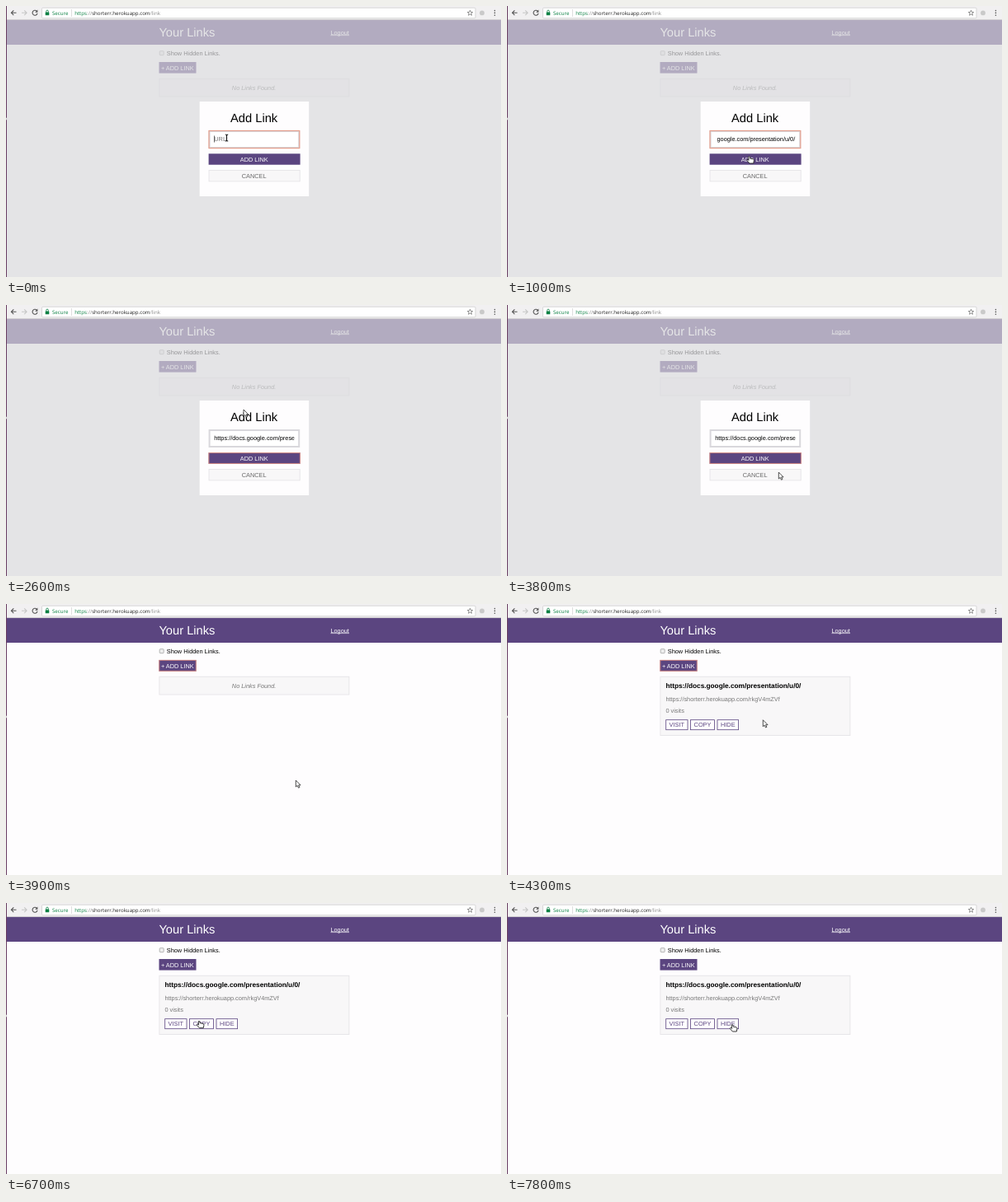
An HTML page for the animation above (8000 ms loop, 600 px wide and 329 px high).

```html
<!DOCTYPE html>
<html lang="en">
<head>
<meta charset="utf-8">
<title>Your Links</title>
<style>
  html, body { margin: 0; height: 100%; overflow: hidden; background: #fefdfe; }
  svg { display: block; width: 100%; height: 100%; }
  text { font: 7.35px "Liberation Sans", Arial, sans-serif; text-rendering: geometricPrecision; white-space: pre; }
  .big { font-size: 14.7px; }
  .bar { font: 6.15px "Open Sans", sans-serif; }
  .mid { text-anchor: middle; }
  .purple { fill: #5b4580; }
  .white { fill: #fff; }
  .grey { fill: #777; }
  .panel { fill: #f8f7f8; stroke: #e3e2e5; stroke-width: .8; }
  .out { fill: #fefdfe; stroke: #5b4580; stroke-width: .8; }
  .ring { fill: none; stroke: #d98a80; stroke-width: .9; }
  .icon { fill: none; stroke: #555; stroke-width: 1.1; }
</style>
</head>
<body>
<svg viewBox="0 0 600 329" preserveAspectRatio="none">
  <!-- page -->
  <rect width="600" height="329" fill="#fefdfe"/>
  <rect class="purple" y="17" width="600" height="30"/>
  <text class="big white" x="185.4" y="37">Your Links</text>
  <text class="white" x="393.4" y="34.5">Logout</text>
  <path d="M393.5 35.6H416" stroke="#fff" stroke-width=".6"/>
  <rect x="186.2" y="54.7" width="5" height="5" rx=".8" fill="#eee" stroke="#a5a5a5" stroke-width=".8"/>
  <text x="194.8" y="60">Show Hidden Links.</text>
  <rect class="purple" x="185.5" y="68" width="45" height="13.6"/>
  <rect id="addRing" class="ring" x="185.8" y="68.3" width="44.4" height="13"/>
  <text class="white" x="187.9" y="77.5">+ ADD LINK</text>

  <g id="empty">
    <rect class="panel" x="185.9" y="88.2" width="230" height="21.8"/>
    <text class="mid grey" x="300.6" y="101.6" font-style="italic" style="font-style:italic">No Links Found.</text>
  </g>
  <g id="card">
    <rect class="panel" x="185.9" y="88.2" width="230" height="71.4"/>
    <text x="192.4" y="102.2" style="font-weight:bold;font-size:8.28px">https://docs.google.com/presentation/u/0/</text>
    <text class="grey" x="192.4" y="117.5">https://shorterr.herokuapp.com/rkgV4mZVf</text>
    <text class="grey" x="192.4" y="132.2">0 visits</text>
    <rect class="out" x="192.7" y="140.7" width="26.3" height="12"/>
    <rect class="out" x="222.5" y="140.7" width="29" height="12"/>
    <rect class="out" x="255" y="140.7" width="25.6" height="12"/>
    <text class="mid purple" x="205.8" y="149.4">VISIT</text>
    <text class="mid purple" x="237" y="149.4">COPY</text>
    <text class="mid purple" x="267.8" y="149.4">HIDE</text>
  </g>

  <g id="modal">
    <rect y="17" width="600" height="312" fill="#dad9dc" opacity=".69"/>
    <rect x="234.7" y="116" width="132.5" height="115" fill="#fefdfe"/>
    <text class="big mid" x="300.6" y="140.5">Add Link</text>
    <rect x="246.6" y="152" width="108.6" height="20" fill="#fff" stroke="#d9d8dc" stroke-width="2"/>
    <rect id="inputRing" x="246" y="151.4" width="109.8" height="21.2" fill="none" stroke="#e59c88" stroke-width="1.1"/>
    <g id="hint">
      <text class="grey" x="252.3" y="164">URL</text>
      <path d="M252.5 157.5V165.5" stroke="#222" stroke-width=".7"/>
    </g>
    <text id="tail" x="349.2" y="164" text-anchor="end">google.com/presentation/u/0/</text>
    <svg id="head" x="252" y="152" width="97.4" height="20">
      <text x=".2" y="12">https://docs.google.com/presentation/u/0/</text>
    </svg>
    <rect class="purple" x="245.6" y="179.3" width="111" height="13.4"/>
    <rect id="okRing" class="ring" x="245.9" y="179.6" width="110.4" height="12.8"/>
    <text class="white mid" x="300.7" y="188.6">ADD LINK</text>
    <rect class="panel" x="246" y="199.5" width="110.2" height="13.4"/>
    <text class="mid" x="300.7" y="208.9" fill="#666">CANCEL</text>
  </g>

  <!-- browser bar -->
  <rect width="600" height="17" fill="#f1f0f1"/>
  <path d="M0 16.6H600" stroke="#c9c7cb" stroke-width=".8"/>
  <rect x="43.5" y="2.2" width="525.5" height="12.6" rx="1.2" fill="#fff" stroke="#c8c8c8" stroke-width=".7"/>
  <path class="icon" d="M12.5 8.3H6.5M9.3 5.4L6.4 8.3L9.3 11.2"/>
  <path class="icon" d="M19 8.3H25M22.2 5.4L25.1 8.3L22.2 11.2" style="stroke:#c6c6c6"/>
  <path class="icon" d="M37.2 6.2A3 3 0 1 0 38 8.9"/>
  <path d="M38.4 4.6V7.8H35.2Z" fill="#555"/>
  <rect x="47.7" y="7.5" width="4.6" height="3.8" rx=".4" fill="#0b8043"/>
  <path d="M48.7 7.8V6.4A1.3 1.3 0 0 1 51.3 6.4V7.8" fill="none" stroke="#0b8043" stroke-width=".8"/>
  <text class="bar" x="56" y="10.6" fill="#0b8043">Secure</text>
  <path d="M79.5 4V13" stroke="#d0d0d0" stroke-width=".7"/>
  <text class="bar" x="83.2" y="10.6" fill="#888"><tspan fill="#0b8043">https</tspan>://<tspan fill="#222">shorterr.herokuapp.com</tspan>/link</text>
  <path d="M562.5 5.2L563.4 7.4L565.7 7.5L563.9 9L564.5 11.3L562.5 10L560.5 11.3L561.1 9L559.3 7.5L561.6 7.4Z" fill="none" stroke="#666" stroke-width=".7"/>
  <circle cx="577" cy="8.4" r="2.9" fill="#c9c9c9"/>
  <g fill="#555"><circle cx="592.4" cy="5.6" r=".8"/><circle cx="592.4" cy="8.4" r=".8"/><circle cx="592.4" cy="11.2" r=".8"/></g>
  <rect y="0" width="1" height="329" fill="#6a3f63"/>
  <path d="M0 135.2L1.6 137L0 138.8Z" fill="#ddd"/>

  <!-- pointers, each with its hot spot at 0,0 -->
  <g id="pointer" stroke-linejoin="round">
    <path id="arrow" d="M0 0V8L1.9 6.4L3.2 9.2L4.6 8.6L3.3 5.9H5.8Z" fill="#fff" stroke="#222" stroke-width=".8"/>
    <path id="hand" d="M-.9 .7Q0 -.5 .8 .6L1.1 2.6L5 3.3Q6 3.7 5.9 5L5.3 8.5H.4L-2.6 5Q-2.7 3.7 -1.4 4.1L-.4 4.9Z" fill="#fff" stroke="#222" stroke-width=".9"/>
    <path id="beam" d="M-1.7 -4Q0 -4 0 -3Q0 -4 1.7 -4M0 -3.2V3.2M-1.7 4Q0 4 0 3Q0 4 1.7 4" fill="none" stroke="#111" stroke-width="1.1"/>
  </g>
</svg>
<script>
const LOOP = 8000, STEP = 100;
// time, x, y of the pointer
const path = [
  [0, 267.5, 160], [300, 267.5, 160], [1000, 293.5, 182.5], [1200, 294.5, 183],
  [1900, 294.5, 183], [2600, 288, 127], [3600, 288, 127], [3800, 329.3, 203],
  [3900, 351.3, 214], [4000, 351.3, 214], [4500, 288, 101], [5300, 223.3, 140.6],
  [5400, 227, 142], [5700, 232, 143], [6600, 232, 143], [7400, 279, 147],
  [7500, 279, 147], [7800, 273, 147.5], [LOOP, 273, 147.5]
];
const el = id => document.getElementById(id);
const show = (id, on) => { el(id).style.display = on ? "" : "none"; };

function pointerAt(t) {
  const i = path.findIndex(p => p[0] > t);
  const [t0, x0, y0] = path[i - 1], [t1, x1, y1] = path[i];
  const u = (t - t0) / (t1 - t0), k = u * u * (3 - 2 * u);
  return [x0 + (x1 - x0) * k, y0 + (y1 - y0) * k];
}

function draw(now) {
  const t = Math.floor(now % LOOP / STEP) * STEP;
  const [x, y] = pointerAt(t);
  const open = t < 3900, pasted = t >= 200, sent = t >= 1600, listed = t >= 4200;
  show("modal", open);
  show("hint", !pasted);
  show("tail", pasted && !sent);
  show("head", sent);
  show("inputRing", !sent);
  show("okRing", sent);
  show("addRing", !open && t < 6000);
  show("empty", !listed);
  show("card", listed);

  const inBox = x > 246 && x < 356;
  const beam = open && inBox && y > 151 && y < 173;
  const hand = open ? inBox && y > 179 && y < 193 : listed && y > 140 && y < 153 && x < 281;
  show("beam", beam);
  show("hand", hand);
  show("arrow", !beam && !hand);
  el("pointer").setAttribute("transform", `translate(${x} ${y})`);
}

const start = performance.now();
function tick() {
  draw(performance.now() - start);
  requestAnimationFrame(tick);
}
tick();
</script>
</body>
</html>
```
